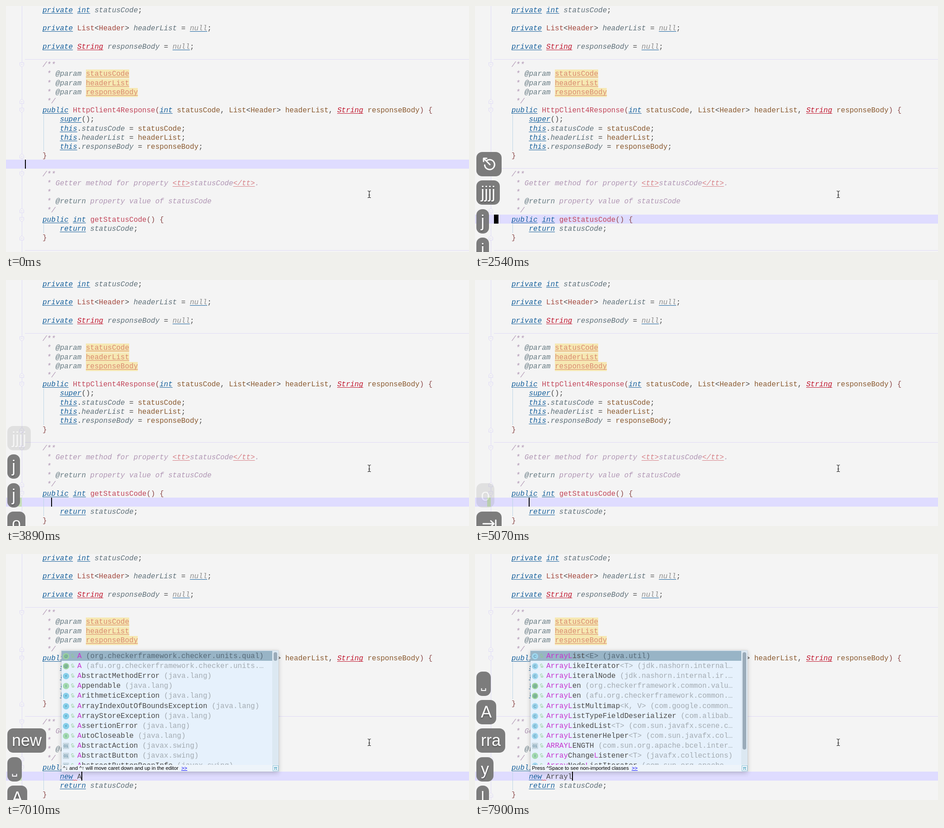
Animation of 1026x546 px, one loop 8 s. Source, as an HTML page:

```html
<!DOCTYPE html>
<html lang="zh">
<head>
<meta charset="utf-8">
<title>Editor with input method</title>
<style>
html, body { margin: 0; width: 1026px; height: 546px; overflow: hidden; background: #f4f4f4; }
#stage { position: relative; width: 1026px; height: 546px; overflow: hidden; }
#stage div, #stage svg { position: absolute; }
.line { white-space: pre; font: 16px/20px "Liberation Mono", monospace; color: #4a4a4a; }
.line span { text-decoration-thickness: 1px; text-underline-offset: 2px; text-decoration-skip-ink: none; }
.k, .f, .s, .n, .c, .a, .g { font-style: italic; }
.k, .s, .n, .y, .g { text-decoration-line: underline; }
.k { color: #16609c; }
.f { color: #5f7079; }
.s { color: #c0142c; }
.n { color: #8e8e8e; text-decoration-color: #16609c; }
.t { color: #a4493f; }
.p { color: #8a5a30; }
.m { color: #c2465a; }
.b { color: #8c4a4a; }
.c { color: #b096b4; }
.a { color: #667a82; }
.g { color: #d67f86; }
.y { color: #d98a70; background: #f6e8b2; display: inline-block; height: 20px; }
.ime { width: 1026px; white-space: pre; overflow: hidden; color: #3a3a3a; box-sizing: border-box; }
.cand { font: 15.6px/22px "Noto Sans CJK SC", "Noto Sans CJK JP", "Noto Sans CJK", sans-serif; }
.popup { top: 214px; width: 481px; height: 269px; background: #e6f1fc; box-shadow: 0 3px 10px rgba(0,0,0,.2), 0 0 1px rgba(0,0,0,.4); }
.list { left: 0; top: 0; width: 481px; height: 254px; overflow: hidden; }
.list .line { left: 35px; top: 2px; }
.pk { color: #a3abb2; }
.hit { color: #c531cf; }
.sel .pk { color: #566a78; }
.icon { width: 14px; height: 14px; border-radius: 50%; font: 9px/14px "Liberation Sans", sans-serif; text-align: center; color: #4a7a92; }
.foot { left: 0; top: 254px; width: 481px; height: 15px; background: #eef4fa; white-space: pre; color: #000; font: 11.35px/15px "Liberation Sans", sans-serif; }
.key { left: 3px; height: 54px; padding: 0 10px; border-radius: 13px; background: #757575; color: #fff;
  font: 36px/54px "Liberation Sans", sans-serif; text-shadow: 0 2px 3px rgba(0,0,0,.4); white-space: pre; }
</style>
</head>
<body>
<div id="stage"></div>
<script>
const LOOP = 8000, ROW = 20.2, COL = 9.6, LEFT = 42.6;
const stage = document.getElementById('stage');

// Each piece begins with its style letter; "." is plain.
const code = {
  0: '    ¦kprivate¦. ¦kint¦. ¦fstatusCode¦.;',
  2: '    ¦kprivate¦. ¦tList¦.<¦tHeader¦.> ¦fheaderList¦. = ¦nnull¦.;',
  4: '    ¦kprivate¦. ¦sString¦. ¦fresponseBody¦. = ¦nnull¦.;',
  6: '    ¦c/**',
  7: '     ¦c* ¦a@param¦. ¦ystatusCode',
  8: '     ¦c* ¦a@param¦. ¦yheaderList',
  9: '     ¦c* ¦a@param¦. ¦yresponseBody',
  10: '     ¦c*/',
  11: '    ¦kpublic¦. ¦mHttpClient4Response¦b(¦kint¦. ¦pstatusCode¦., ¦pList¦.<¦pHeader¦.> ¦pheaderList¦., ¦sString¦. ¦presponseBody¦b) {',
  12: '        ¦ksuper¦.();',
  13: '        ¦kthis¦..¦fstatusCode¦. = ¦pstatusCode¦.;',
  14: '        ¦kthis¦..¦fheaderList¦. = ¦pheaderList¦.;',
  15: '        ¦kthis¦..¦fresponseBody¦. = ¦presponseBody¦.;',
  16: '    ¦b}',
  18: '    ¦c/**',
  19: '     ¦c* Getter method for property ¦g<tt>¦cstatusCode¦g</tt>¦c.',
  20: '     ¦c*',
  21: '     ¦c* ¦a@return¦c property value of statusCode',
  22: '     ¦c*/',
  23: '    ¦kpublic¦. ¦kint¦. ¦mgetStatusCode¦b() {',
  24: '        ¦kreturn¦. ¦fstatusCode¦.;',
  25: '    ¦b}'
};

// time, row, column, caret, typed text, composed letters, popup, squiggle
const steps = [
  [0, 17, 0, 'bar'], [300, 17, 0, ''], [450, 17, 0, 'bar'], [890, 17, 0, 'block'],
  [1340, 17, 1, 'block', '', 1], [1490, 17, 3, 'block', '', 2],
  [1640, 17, 5, 'block', '', 3], [1790, 17, 7, 'block', '', 4],
  [2090, 21, 0, 'block'], [2240, 22, 0, 'block'], [2540, 23, 0, 'block'],
  [2990, 24, 6, 'bar'], [4780, 24, 8, 'bar'],
  [5520, 24, 11, 'bar', 'new'], [5670, 24, 11, 'bar', 'new', 0, 'new'],
  [6110, 24, 12, 'bar', 'new '], [6410, 24, 12, 'bar', 'new ', 0, '', 1],
  [6710, 24, 13, 'bar', 'new A', 0, '', 1], [6860, 24, 13, 'bar', 'new A', 0, 'a', 1],
  [7160, 24, 14, 'bar', 'new Ar', 0, 'arr', 1], [7310, 24, 15, 'bar', 'new Arr', 0, 'arr', 1],
  [7450, 24, 16, 'bar', 'new Arra', 0, 'arr', 1], [7600, 24, 17, 'bar', 'new Array', 0, 'arr', 1],
  [7900, 24, 18, 'bar', 'new Arrayl', 0, 'list', 1]
];

// label, first press, gap between letters
const keys = [
  ['esc', 890], ['jjjj', 1340, 150], ['j', 2240], ['j', 2540], ['o', 2990], ['tab', 4780],
  ['new', 5520, 0], ['space', 5960], ['A', 6710], ['rra', 7160, 145], ['y', 7600], ['l', 7900]
];

const imported = 'Press ^Space to see non-imported classes';
const popups = {
  new: { x: 84, thumb: 100, tip: 'Press ^. to choose the selected (or first) suggestion and insert a dot afterwards', items: [
    '-new', 'CNEW (com.sun.org.apache.bcel.internal.gene…', 'CNewArrayExpression (sun.tools.tree)',
    'CNewInstanceExpression (sun.tools.tree)', 'CNewInstance<T> (org.hibernate.validator.in…',
    '@NewInstance (afu.org.checkerframework.comm…', '@NewInstance (org.checkerframework.common.r…',
    'CNewThreadAction (sun.rmi.runtime)', 'CNewConstructorTypeMunger (org.aspectj.weav…',
    'CNewFieldTypeMunger (org.aspectj.weaver)', 'CNewInstanceInstantiator<T> (org.springfram…',
    'CNewJaxbContext (org.hibernate.validator.in…'] },
  a: { x: 123, thumb: 19, tip: '^↓ and ^↑ will move caret down and up in the editor', items: [
    '@A (org.checkerframework.checker.units.qual)', '@A (afu.org.checkerframework.checker.units.…',
    'EAbstractMethodError (java.lang)', 'IAppendable (java.lang)', 'EArithmeticException (java.lang)',
    'EArrayIndexOutOfBoundsException (java.lang)', 'EArrayStoreException (java.lang)',
    'EAssertionError (java.lang)', 'IAutoCloseable (java.lang)', '0AbstractAction (javax.swing)',
    '0AbstractButton (javax.swing)', '0AbstractButtonBeanInfo (javax.swing)'] },
  arr: { x: 123, thumb: 40, tip: imported, items: [
    'EArrayIndexOutOfBoundsException (java.lang)', 'EArrayStoreException (java.lang)',
    'CArrayList<E> (java.util)', 'CArrays (java.util)', 'CArrayDeque<E> (java.util)', 'IArray (java.sql)',
    'CArray (java.lang.reflect)', 'CArrayBlockingQueue<E> (java.util.concurren…',
    'CArrayLikeIterator<T> (jdk.nashorn.internal…', 'CArrayLiteralNode (jdk.nashorn.internal.ir.…',
    '@ArrayLen (org.checkerframework.common.valu…', 'CArrayListMultimap<K, V> (com.google.common…'] },
  list: { x: 123, thumb: 216, tip: imported, items: [
    'CArrayList<E> (java.util)', 'CArrayLikeIterator<T> (jdk.nashorn.internal…',
    'CArrayLiteralNode (jdk.nashorn.internal.ir.…', '@ArrayLen (org.checkerframework.common.valu…',
    '@ArrayLen (afu.org.checkerframework.common.…', 'CArrayListMultimap<K, V> (com.google.common…',
    'CArrayListTypeFieldDeserializer (com.alibab…', 'CArrayLinkedList<T> (com.sun.javafx.scene.c…',
    'CArrayListenerHelper<T> (com.sun.javafx.col…', '0ARRAYLENGTH (com.sun.org.apache.bcel.inter…',
    'IArrayChangeListener<T> (javafx.collections)', 'CArrayNodeListIterator (com.sun.org.apache.…'] }
};

const iconColor = { C: '#9fd6ee', '@': '#9ad29c', I: '#a3dab0', E: '#86cfea', 0: '#c8d8e2' };
const iconSign = { E: '⚡\uFE0E', 0: '01' };
const candidates = [
  ['就', '及', '将', '家', '几', '见', '叫', '级', '机', '今', '加', '件'],
  ['经济', '京津', '仅仅', '积极', '结局', '季节', '家具', '进军'],
  ['紧接着', '解决就', '经济局', '近几季', '就急急'],
  ['斤斤计较', '就' + '急'.repeat(62)]
];

const esc = s => s.replace(/&/g, '&amp;').replace(/</g, '&lt;').replace(/>/g, '&gt;');
const span = (cls, s) => `<span class="${cls}">${esc(s)}</span>`;
const box = (x, y, w, h, color) =>
  `<div style="left:${x}px;top:${y}px;width:${w}px;height:${h}px;background:${color}"></div>`;
const svg = (w, h, body, at = 'left:0;top:0') =>
  `<svg width="${w}" height="${h}" style="${at}" fill="none">${body}</svg>`;
const textLine = (row, col, html) =>
  `<div class="line" style="left:${LEFT + col * COL}px;top:${(row * ROW).toFixed(1)}px">${html}</div>`;

function codeLine(row, src) {
  const [indent, ...parts] = src.split('¦');
  return textLine(row, indent.length, parts.map(p => span(p[0], p.slice(1))).join(''));
}

function gutter(added) {
  const y = r => ((r + (added && r > 23 ? 1 : 0)) * ROW).toFixed(1);
  const fold = (r, flip) => `<g transform="translate(35 ${+y(r) + 9.5}) scale(1 ${flip})">` +
    '<path d="M-4.5-5h9v6l-4.5 4-4.5-4z" fill="#f4f4f4"/><path d="M-2-1h4"/></g>';
  const rule = r => `<path d="M42 ${Math.floor(+y(r) - 3) + .5}H1026"/>`;
  return svg(1026, 546, '<g stroke="#dfdaf7"><path d="M35.5 0V546"/>' +
    rule(6) + rule(18) + rule(27) +
    [6, 11, 18, 23].map(r => fold(r, 1)).join('') + [10, 16, 22, 25].map(r => fold(r, -1)).join('') +
    `</g><path d="M83.5 241V322M83.5 483V${+y(25) - 1}" stroke="#bcd6e6"/>`);
}

function compose(n) {
  let typed = '';
  for (let i = 0; i < n; i++) typed += (i ? "<span style='color:#2b86cc'>'</span>" : '') +
    `<span style="color:${i && i === n - 1 ? '#2b86cc' : '#555'}">j</span>`;
  const plain = Array(n).fill('j').join("'");
  const words = candidates[n - 1].map((w, i) => i ? `${i + 1}.${w}` : `<span style="color:#1b7cc2">1.${w}</span>`);
  return box(26, 342, 8, 19, '#b9d7e6') + textLine(17, 0, typed) +
    box(43, 359, (2 * n - 1) * COL, 1, '#666') +
    `<div class="ime" style="top:362px;height:27px;padding-left:1px;background:rgba(248,248,248,.8);border:solid #a4a4a4;border-width:1px 0;font:16px/26px 'Liberation Sans',sans-serif">${plain}<span style="border-left:1px solid #000"></span></div>` +
    box(0, 389, 1026, 3, 'rgba(248,248,248,.8)') +
    `<div class="ime cand" style="top:391px;height:26px;padding-left:3px;background:rgba(247,247,247,.88);border-bottom:1px solid #a4a4a4">${words.join('  ')}</div>`;
}

// Colour the letters of a name that answer to the query, in order.
function mark(name, query) {
  let i = 0;
  return [...name].map(ch => {
    const hit = i < query.length && ch.toLowerCase() === query[i].toLowerCase();
    if (hit) i++;
    return hit ? span('hit', ch) : esc(ch);
  }).join('');
}

const lock = svg(8, 10, '<path d="M1 5V3q0-2 2-2t2 2M2.5 5.5h4v3h-4z" stroke="#8ccb8c"/>', 'left:21px;top:6px');

function item(src, i, query) {
  const kind = src[0], text = src.slice(1), cut = (text + ' ').search(/[< ]/);
  const icon = kind === '-' ? '' :
    `<div class="icon" style="left:3px;top:5px;background:${iconColor[kind]};${kind === '0' ? 'border-radius:2px;' : ''}">${iconSign[kind] || kind}</div>${lock}`;
  return `<div class="${i ? '' : 'sel'}" style="left:0;top:${(1 + i * 22.1).toFixed(1)}px;width:467px;height:22px;${i ? '' : 'background:#98b4c6'}">` +
    icon + `<div class="line">${mark(text.slice(0, cut), query)}${span('pk', text.slice(cut))}</div></div>`;
}

function popup(id, query) {
  const p = popups[id];
  return `<div class="popup" style="left:${p.x}px"><div class="list">` +
    p.items.map((s, i) => item(s, i, query)).join('') +
    box(467, 0, 14, 254, '#dce8f2') +
    `<div style="left:470px;top:4px;width:8px;height:${p.thumb}px;border-radius:4px;background:#9aabb9"></div></div>` +
    `<div class="foot"> ${esc(p.tip)}  <span style="color:#00f;text-decoration:underline">&gt;&gt;</span>` +
    `<div style="left:468px;top:1px;width:11px;height:11px;border:1px solid #8cc4d8;color:#1c8fb0;line-height:11px;text-align:center">π</div></div></div>`;
}

const pen = '<g stroke="#fff" stroke-width="3" stroke-linecap="round" stroke-linejoin="round">';
const signs = {
  esc: [56, pen + '<path d="M24 18.5A11 11 0 1 1 18.5 29M30 28L16 14M16 21V14H23"/></g>'],
  tab: [56, pen + '<path d="M15 27H38M32 20.5L39 27L32 33.5M43 19V35"/></g>'],
  space: [32, '<path d="M11.5 37V42H20.5V37" stroke="#fff" stroke-width="2"/>']
};

function keyTiles(t) {
  const shown = keys.filter(k => k[1] <= t);
  return shown.map(([label, start, gap = 0], i) => {
    const sign = signs[label];
    const last = start + (sign ? 0 : (label.length - 1) * gap);
    const age = t - last;
    if (age >= 2200) return '';
    const count = gap ? Math.floor((t - start) / gap) + 1 : label.length;
    const top = 514 - (shown.length - 1 - i) * 63.3;
    return `<div class="key" style="top:${top.toFixed(1)}px;opacity:${age < 2050 ? .94 : .15};` +
      (sign ? `width:${sign[0] - 20}px">${svg(sign[0], 54, sign[1])}` : `">${label.slice(0, count)}`) + '</div>';
  }).join('');
}

function editor([, row, col, caret, typed = '', letters = 0, list = '', squiggle]) {
  const added = row === 24, top = Math.round(row * ROW - 2);
  let html = gutter(added) + box(0, top, 1026, 20, '#dfdcff');
  if (added) html += box(27, top, 8, 20, '#c6dfb9') + svg(2, 20, '<path d="M.5 0V20" stroke="#bcd6e6"/>', 'left:83px;top:483px');
  for (const r in code) html += codeLine(+r + (added && r > 23 ? 1 : 0), code[r]);
  if (typed) html += textLine(24, 8, span('k', typed.slice(0, 3)) + typed.slice(3));
  if (squiggle) html += svg(10, 4, '<path d="M0 3L2 1L4 3L6 1L8 3L10 1" stroke="#e03030"/>', 'left:148px;top:500px');
  if (letters) html += compose(letters);
  if (caret) html += box(LEFT + col * COL - .6, top, caret === 'bar' ? 2 : 10, 20, '#000');
  if (list) html += popup(list, typed.replace(/^new /, ''));
  return html;
}

const mouse = svg(10, 18, '<path d="M1.5 1.5Q5 1.5 5 4Q5 1.5 8.5 1.5M5 4V14M1.5 16.5Q5 16.5 5 14Q5 16.5 8.5 16.5M3 10.5H7" stroke="#222" stroke-width="1.2"/>', 'left:800px;top:409px');

let shownHtml = '';
function frame() {
  const t = performance.now() % LOOP;
  const html = editor(steps.filter(s => s[0] <= t).pop()) + mouse + keyTiles(t);
  if (html !== shownHtml) stage.innerHTML = shownHtml = html;
  requestAnimationFrame(frame);
}
frame();
</script>
</body>
</html>
```
